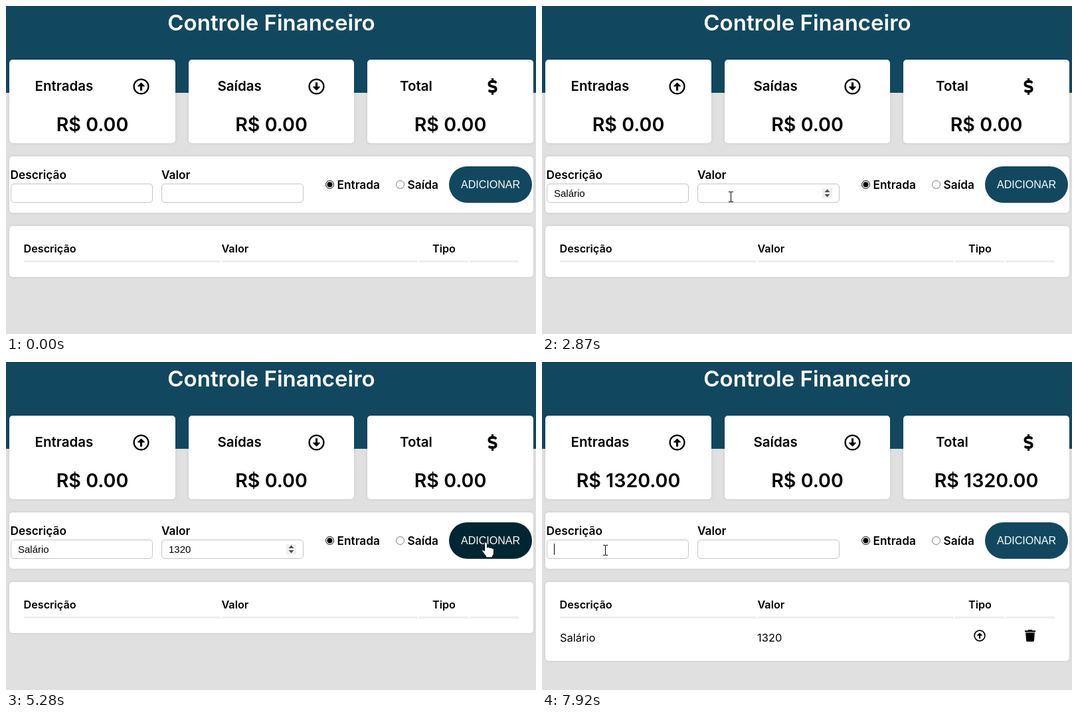
Animation of 798 by 495 pixels, one loop 8 s. Source, as an HTML page:

```html
<!DOCTYPE html>
<html lang="pt-BR">
<head>
<meta charset="utf-8">
<title>Controle Financeiro</title>
<style>
  html, body { margin: 0; width: 100%; height: 100%; overflow: hidden; background: #e0e0e0; }
  svg { display: block; width: 798px; height: 495px; }
  text { font-family: Inter, "Open Sans", sans-serif; font-weight: 600; white-space: pre; }
  .title { font-size: 33px; fill: #fff; }
  .name { font-size: 20.5px; }
  .money { font-size: 28.6px; }
  .label { font-size: 17.3px; }
  .head { font-size: 16.2px; }
  .cell { font-size: 16.5px; font-weight: 400; }
  .field { font: 15px "Liberation Sans", Arial, sans-serif; }
  .button { font: 16px "Liberation Sans", Arial, sans-serif; fill: #fff; }
  .middle { text-anchor: middle; }
  .card { fill: #fff; filter: drop-shadow(0 0 2px rgba(0, 0, 0, .1)); }
  .input { fill: #fff; stroke: #c4c4c4; }
  .line { fill: none; stroke: #000; }
  .pointer { fill: #fff; stroke: #000; }
</style>
</head>
<body>
<svg viewBox="0 0 798 495">
  <defs>
    <g id="arrowIcon">
      <circle r="224" class="line" stroke-width="48"/>
      <path d="M-32 128V0h-67q-20-2-8.500-20.500l99-99q8.500-7 17 0l99 99Q119-2 99 0H32v116q0 12-12 12h-40q-12 0-12-12z"/>
    </g>
  </defs>

  <path d="M0 0H798V131H0z" fill="#12485f"/>
  <text class="title middle" x="399.500" y="36.500">Controle Financeiro</text>

  <rect class="card" x="5" y="81" width="250" height="126" rx="5"/>
  <rect class="card" x="275" y="81" width="249" height="126" rx="5"/>
  <rect class="card" x="544" y="81" width="250" height="126" rx="5"/>
  <text class="name" x="43.500" y="128">Entradas</text>
  <text class="name" x="318.500" y="128">Saídas</text>
  <text class="name" x="593" y="128">Total</text>
  <use href="#arrowIcon" transform="translate(203.500 121.500) scale(.0488)"/>
  <use href="#arrowIcon" transform="translate(467.500 121.500) scale(.0488 -.0488)"/>
  <g class="line" transform="translate(725.500 109) scale(.0488)">
    <path stroke-width="80" stroke-linecap="round" d="M236 122Q208 104 176 104H110C69 104 40 136 40 173 40 204 60 231 90 240L198 272C228 281 248 307 248 338 248 378 216 408 178 408H112Q80 408 52 390"/>
    <path stroke-width="64" d="M144 0V104M144 408V512"/>
  </g>
  <text class="money middle" id="income" x="130" y="189">R$ 0.00</text>
  <text class="money middle" x="399.500" y="189">R$ 0.00</text>
  <text class="money middle" id="total" x="669" y="189">R$ 0.00</text>

  <rect class="card" x="5" y="227" width="789" height="85" rx="5"/>
  <text class="label" x="6.500" y="261">Descrição</text>
  <text class="label" x="234" y="261">Valor</text>
  <rect class="input" x="7.500" y="268.500" width="213" height="28" rx="4.500"/>
  <rect class="input" x="234.500" y="268.500" width="213" height="28" rx="4.500"/>
  <text class="field" id="desc" x="18" y="288"></text>
  <text class="field" id="value" x="245" y="288"></text>
  <g id="spinner">
    <path d="M422 275h15v15h-15z" fill="#efefef"/>
    <path d="M425.500 281h8l-4-4.500zM425.500 284h8l-4 4.500z" fill="#505050"/>
  </g>
  <rect id="caret" y="274" width="1" height="17"/>
  <circle class="line" cx="487.500" cy="269.500" r="6"/>
  <circle cx="487.500" cy="269.500" r="4"/>
  <circle cx="593.500" cy="269.500" r="6" fill="#fff" stroke="#767676"/>
  <text class="label" x="498.500" y="276">Entrada</text>
  <text class="label" x="604.500" y="276">Saída</text>
  <rect id="button" x="667" y="242" width="125" height="55" rx="27.500"/>
  <text class="button middle" x="729.500" y="275">ADICIONAR</text>

  <rect class="card" id="table" x="5" y="332" width="789" height="77" rx="5"/>
  <text class="head" x="26.500" y="372">Descrição</text>
  <text class="head" x="324.500" y="372">Valor</text>
  <text class="head" x="642" y="372">Tipo</text>
  <path d="M27 385.500H323M325 385.500H620M622 385.500H696M698 385.500H772" stroke="#eee" stroke-width="3"/>
  <g id="row">
    <text class="cell" x="27" y="422">Salário</text>
    <text class="cell" x="324" y="422">1320</text>
    <use href="#arrowIcon" transform="translate(659 413) scale(.0352)"/>
    <path d="M727 405.200h4.500l1-1.200h5l1 1.200h4.500v2.300h-16zM728.200 408.600h13.600l-.8 12q-.1 1.400-1.500 1.400h-9q-1.400 0-1.500-1.400z"/>
  </g>

  <g id="cursor">
    <path id="arrow" class="pointer" d="M.5.5v16l3.700-3.600 2.400 5.600 2.300-1-2.400-5.400h5.200z"/>
    <path id="beam" class="line" d="M-3.500-7.500h3M.5-7.500h3M0-7.500v15M-3.500 7.500h3M.5 7.500h3"/>
    <path id="hand" class="pointer" d="M-2 13V2a2 2 0 0 1 4 0V8q2-1.500 4 .5 2-1 3.500.8 2.500-.5 2.500 2V16q0 3-2 5v2H0v-2Q-3 17-6 13q1-3 4 0z"/>
    <path id="resize" class="pointer" d="M-9 0l4.500-4.500v3h9v-3L9 0 4.500 4.500v-3h-9v3z"/>
  </g>
</svg>
<script>
const LOOP = 8000, CLICK_ADD = 5410;
const $ = id => document.getElementById(id);
const show = (id, on) => $(id).setAttribute('visibility', on ? 'visible' : 'hidden');
const latest = (steps, t) => steps.findLast(step => step[0] <= t);

// [time, shape, x, y]
const pointer = [
  [0, ''],
  [130, 'arrow', 459, 441], [200, 'arrow', 380, 412], [270, 'arrow', 255, 362],
  [330, 'arrow', 140, 318], [400, 'beam', 68, 288], [470, 'beam', 42.5, 282],
  [800, 'beam', 47.5, 277], [870, 'beam', 44.5, 281], [930, 'beam', 41.5, 282.5],
  [2070, 'beam', 70, 283], [2130, 'beam', 136, 285], [2200, 'beam', 215, 288],
  [2270, 'beam', 268, 289], [2330, 'beam', 282.5, 289], [2470, 'beam', 284.5, 288],
  [4600, 'beam', 345, 289], [4670, 'arrow', 570, 299], [4740, 'arrow', 724, 301],
  [4940, 'resize', 804, 270], [5000, 'hand', 775, 272], [5070, 'hand', 748, 274],
  [5140, 'hand', 733, 274], [5200, 'hand', 726, 273], [5270, 'hand', 722.5, 272],
  [5680, 'hand', 712, 279], [5750, 'arrow', 650, 335], [5820, 'arrow', 560, 396],
  [5880, 'arrow', 460, 438], [5950, 'arrow', 375, 452], [6010, 'arrow', 300, 450],
  [6080, 'arrow', 235, 442], [6150, 'arrow', 192, 431], [6210, 'arrow', 165, 420],
  [6310, 'arrow', 146, 406], [6380, 'arrow', 118, 362], [6450, 'arrow', 96, 317],
  [6520, 'arrow', 95, 301], [6590, 'beam', 94.5, 290], [6660, 'beam', 94.5, 286],
  [6730, 'beam', 95.5, 284]
];

// [time, description, value, caret x or 0]
const typing = [
  [0, '', '', 0], [800, '', '', 18], [1400, '', '', 0],
  [1600, 'Sal', '', 39], [1800, 'Salá', '', 48], [1870, 'Salár', '', 53],
  [1930, 'Salári', '', 56], [2000, 'Salário', '', 64],
  [2330, 'Salário', '', 245], [2870, 'Salário', '', 0],
  [3330, 'Salário', '1', 253], [3600, 'Salário', '13', 261],
  [3870, 'Salário', '132', 270], [4070, 'Salário', '1320', 278],
  [4600, 'Salário', '1320', 0], [CLICK_ADD, '', '', 0],
  [6860, '', '', 18], [7390, '', '', 0], [7920, '', '', 18]
];

function draw(t) {
  const [, shape, x, y] = latest(pointer, t);
  for (const id of ['arrow', 'beam', 'hand', 'resize']) show(id, id === shape);
  if (shape) $('cursor').setAttribute('transform', `translate(${x} ${y})`);
  $('button').setAttribute('fill', shape === 'hand' ? '#002633' : '#12485f');

  const [, desc, value, caret] = latest(typing, t);
  $('desc').textContent = desc;
  $('value').textContent = value;
  $('caret').setAttribute('x', caret);
  show('caret', caret > 0);
  show('spinner', t >= 2270 && t < CLICK_ADD);

  const added = t >= CLICK_ADD;
  $('income').textContent = $('total').textContent = added ? 'R$ 1320.00' : 'R$ 0.00';
  $('table').setAttribute('height', added ? 119 : 77);
  show('row', added);
}

const start = performance.now();
function tick() {
  draw((performance.now() - start) % LOOP);
  requestAnimationFrame(tick);
}
tick();
</script>
</body>
</html>
```
